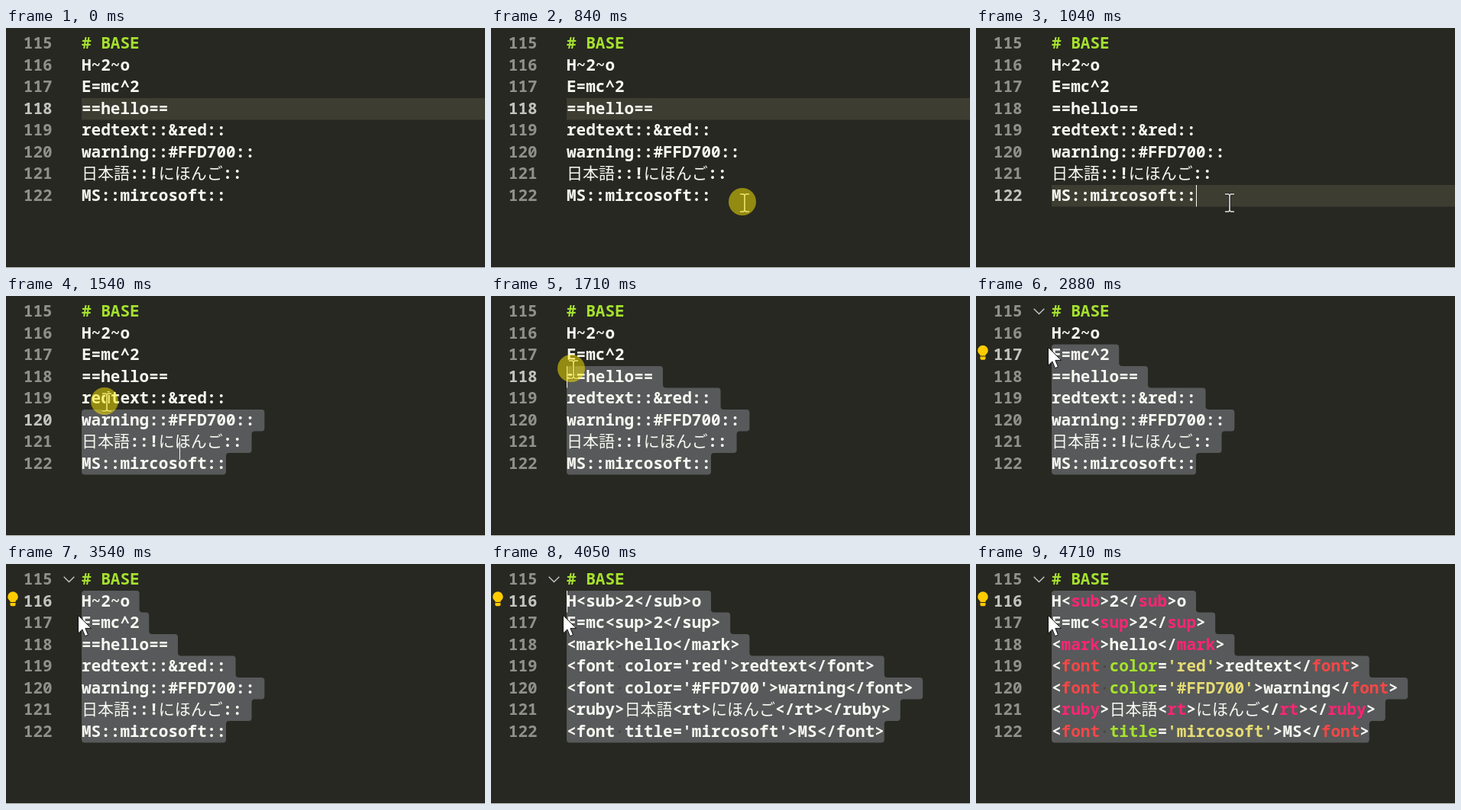
These frames come from a looping animation (627x315 px, 5050 ms). An HTML page:

```html
<!DOCTYPE html>
<html lang="en">
<head>
<meta charset="utf-8">
<title>Markup shorthand expansion</title>
<style>
  html, body { margin: 0; width: 100%; height: 100%; overflow: hidden; background: #272822; }
  svg { display: block; }
  text {
    font: 700 21px "Noto Sans Mono", "DejaVu Sans Mono", monospace;
    font-variant-ligatures: none;
    white-space: pre;
    fill: #f8f8f2;
  }
  .cjk { font-family: "Noto Sans CJK JP", "Noto Sans CJK", sans-serif; font-weight: 400; }
  .num { fill: #90908a; }
  .num.on { fill: #c2c2bf; }
  .head { fill: #a6e22e; }
  .dot { fill: #464741; }
  .colored .tag { fill: #f92672; }
  .colored .old { fill: #f44747; }
  .colored .attr { fill: #a6e22e; }
  .colored .str { fill: #e6db74; }
</style>
</head>
<body>
<svg id="stage" width="627" height="315" viewBox="0 0 627 315">
  <rect width="627" height="315" fill="#272822"/>
  <rect id="band" x="99" width="528" height="28.5" fill="#3e3d32"/>
  <path id="sel" fill="#57595a"/>
  <g id="nums"></g>
  <text class="head" x="99" y="27.2"># BASE</text>
  <g id="short"></g>
  <g id="html"></g>
  <path id="fold" d="M75.7 16.8l6.8 6.8 6.8-6.8" fill="none" stroke="#c5c5c5" stroke-width="1.4"/>
  <g id="bulb" fill="#fc0">
    <path d="M9 1.3a6.8 6.8 0 0 1 6.8 6.8c0 2.6-1.5 4.2-3.3 5.6v1.3h-7v-1.3C3.700 12.300 2.200 10.700 2.200 8.100A6.800 6.800 0 0 1 9 1.300z"/>
    <path d="M5.500 16h7v2.600q0 1.700-1.700 1.700h-3.600q-1.700 0-1.700-1.700z"/>
  </g>
  <rect id="caret" width="1" height="28.5" fill="#f8f8f0"/>
  <g id="beam" fill="none">
    <path id="beamShape" d="M-6-11.500h4.500l1.500 1.500 1.500-1.500h4.500M-6 11.500h4.500l1.500-1.500 1.500 1.500h4.500M0-10v20" stroke="#222" stroke-width="3"/>
    <use href="#beamShape"/>
    <path d="M-6-11.500h4.500l1.500 1.500 1.500-1.500h4.500M-6 11.500h4.500l1.500-1.500 1.500 1.500h4.500M0-10v20" stroke="#e2e2dc" stroke-width="1.600"/>
  </g>
  <circle id="press" r="18" fill="#ffeb00" opacity=".5"/>
  <path id="arrow" d="M94.500 67.300v23.800l5.400-5.200 3.600 8.800 4-1.700-3.600-8.600h7.600z" fill="#fff" stroke="#111"/>
  <rect y="314" width="627" height="1" fill="#d0d0d0"/>
</svg>
<script>
const LOOP = 5050, LEFT = 99, ROW = 28.5, CHAR = 12.6, WIDE = 21, FIRST = 116, LAST = 122;
const SHORT = [
  "H~2~o", "E=mc^2", "==hello==", "redtext::&red::",
  "warning::#FFD700::", "日本語::!にほんご::", "MS::mircosoft::"
];
const HTML = [
  "H<sub>2</sub>o", "E=mc<sup>2</sup>", "<mark>hello</mark>",
  "<font color='red'>redtext</font>", "<font color='#FFD700'>warning</font>",
  "<ruby>日本語<rt>にほんご</rt></ruby>", "<font title='mircosoft'>MS</font>"
];

// Each entry changes only the parts it names; "mouse" is the press centre.
const STEPS = [
  [0, { row: 118, from: 0, lines: SHORT, colored: false, caret: null, mouse: null,
        press: false, arrow: false, fold: 0, bulb: 0 }],
  [330, { mouse: [368, 250] }],
  [500, { mouse: [329, 228] }],
  [840, { press: true }],
  [1040, { press: false, row: 122, caret: [288, 206] }],
  [1380, { press: true }],
  [1540, { mouse: [129, 138], row: 120, from: 120, caret: [227, 186.5] }],
  [1710, { mouse: [105, 95], row: 118, from: 118, caret: [LEFT, 92] }],
  [1880, { mouse: [93, 79], row: 117, from: 117, caret: [LEFT, 63.5] }],
  [2040, { mouse: [93, 70], bulb: 117 }],
  [2210, { mouse: [94, 68.5] }],
  [2380, { mouse: null, press: false, arrow: true, fold: .25 }],
  [2550, { fold: .5 }],
  [2710, { fold: .75 }],
  [2880, { fold: 1, caret: null }],
  [3050, { row: 116, from: 116, caret: [LEFT, 35] }],
  [3210, { bulb: 116 }],
  [3540, { caret: null }],
  [4050, { lines: HTML, caret: [LEFT, 35] }],
  [4210, { colored: true }],
  [4710, { caret: null }]
];

const $ = id => document.getElementById(id);
const rowTop = n => 92 + (n - 118) * ROW;
const baseline = n => rowTop(n) + 20.7;
const isWide = c => /[\u3040-\u9fff]/.test(c);
const textWidth = s => [...s].reduce((w, c) => w + (isWide(c) ? WIDE : CHAR), 0);
const esc = s => s.replace(/&/g, "&amp;").replace(/</g, "&lt;");
const span = (cls, s) => `<tspan class="${cls}">${esc(s)}</tspan>`;

function markup(line) {
  const token = /('[^']*')|([a-z]+)(?==)|(<\/?)([a-z]+)|([\u3040-\u9fff]+)|[^]/g;
  return line.replace(token, (all, str, attr, open, tag, cjk) =>
    str ? span("str", str) :
    attr ? span("attr", attr) :
    tag ? esc(open) + span(tag === "font" ? "old" : "tag", tag) :
    cjk ? span("cjk", cjk) : esc(all));
}

function drawLines(group, lines, mark) {
  group.innerHTML = lines.map((line, i) => {
    const n = FIRST + i, gap = line.indexOf(" ");
    const dot = gap < 0 ? "" :
      `<circle class="dot" cx="${LEFT + (gap + .5) * CHAR}" cy="${rowTop(n) + 14}" r="1.6"/>`;
    return `<text x="${LEFT}" y="${baseline(n)}">${mark(line)}</text>${dot}`;
  }).join("");
}

// Closed polygon with every corner rounded, convex or concave.
function rounded(points, r) {
  const toward = ([x, y], [u, v]) => {
    const d = Math.hypot(u - x, v - y), k = Math.min(r, d / 2) / d;
    return [x + (u - x) * k, y + (v - y) * k];
  };
  const count = points.length;
  return points.map((p, i) => {
    const a = toward(p, points[(i + count - 1) % count]);
    const b = toward(p, points[(i + 1) % count]);
    return `${i ? "L" : "M"}${a}Q${p} ${b}`;
  }).join("") + "Z";
}

function selection(from, lines) {
  if (!from) return "";
  const points = [[LEFT, rowTop(from)]];
  for (let n = from; n <= LAST; n++) {
    const x = LEFT + textWidth(lines[n - FIRST]) + (n < LAST ? CHAR : 0);
    points.push([x, rowTop(n)], [x, rowTop(n + 1)]);
  }
  points.push([LEFT, rowTop(LAST + 1)]);
  return rounded(points, 4);
}

function place(el, pos, dx = 0, dy = 0) {
  el.style.display = pos ? "" : "none";
  if (pos) el.setAttribute("transform", `translate(${pos[0] + dx} ${pos[1] + dy})`);
}
const show = (el, on) => { el.style.display = on ? "" : "none"; };

function render(s) {
  place($("band"), s.from ? null : [0, rowTop(s.row)]);
  $("sel").setAttribute("d", selection(s.from, s.lines));
  [...$("nums").children].forEach((el, i) => el.classList.toggle("on", i + 115 === s.row));
  show($("short"), s.lines === SHORT);
  show($("html"), s.lines === HTML);
  $("html").classList.toggle("colored", s.colored);
  $("fold").style.opacity = s.fold;
  place($("bulb"), s.bulb ? [0, rowTop(s.bulb)] : null);
  place($("caret"), s.caret);
  place($("beam"), s.mouse, 3, 1.5);
  place($("press"), s.press ? s.mouse : null);
  show($("arrow"), s.arrow);
}

for (let n = 115; n <= LAST; n++) {
  $("nums").innerHTML += `<text class="num" x="22.8" y="${baseline(n)}">${n}</text>`;
}
drawLines($("short"), SHORT, line =>
  line.replace(/[\u3040-\u9fff]+|[^\u3040-\u9fff]+/g, s => isWide(s[0]) ? span("cjk", s) : esc(s)));
drawLines($("html"), HTML, markup);

let shown = -1;
const start = performance.now();
function tick() {
  const t = (performance.now() - start) % LOOP;
  const past = STEPS.filter(([at]) => at <= t);
  if (past.length !== shown) {
    shown = past.length;
    render(Object.assign({}, ...past.map(([, change]) => change)));
  }
  requestAnimationFrame(tick);
}
tick();
</script>
</body>
</html>
```
